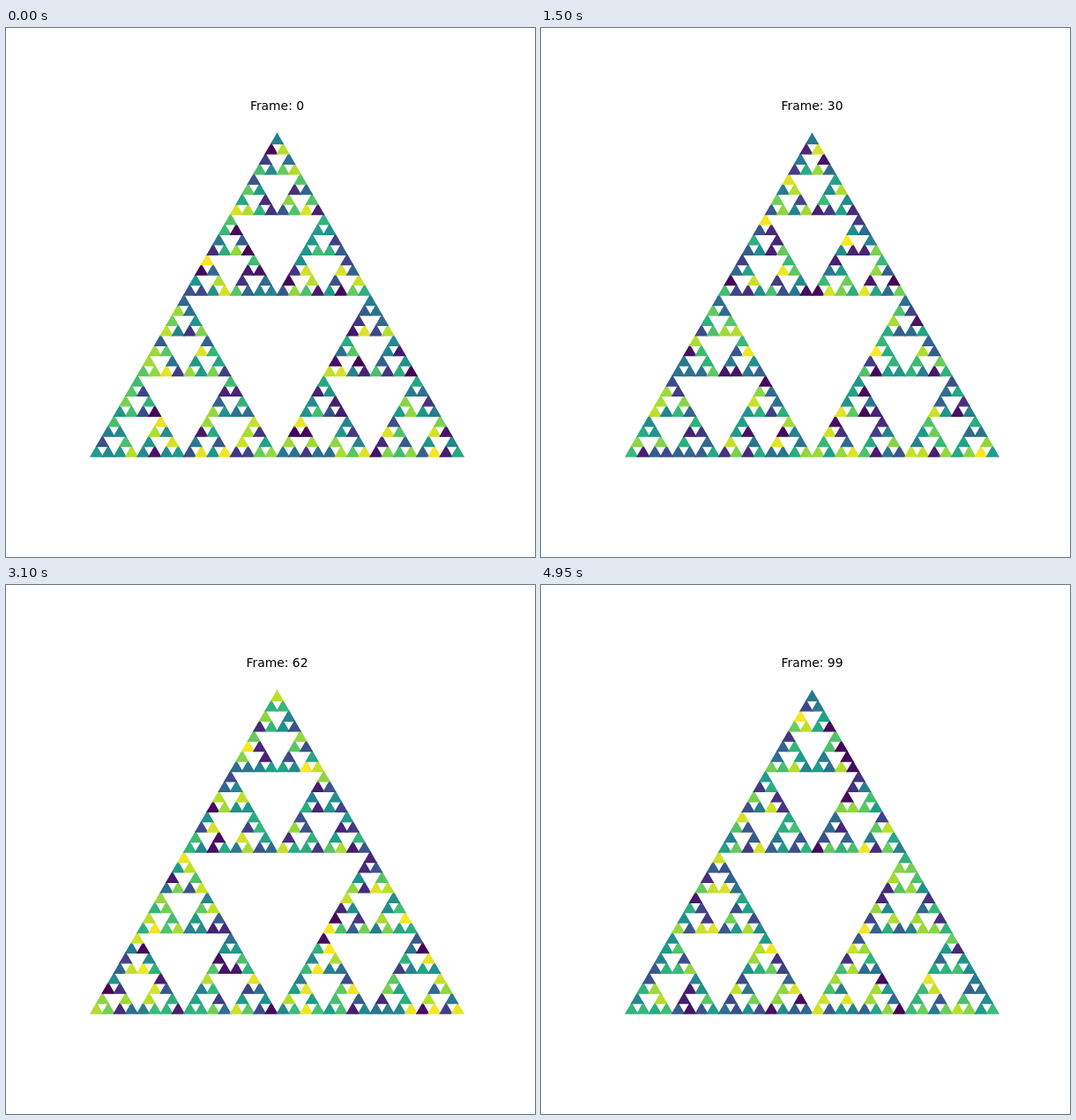
An HTML page with a canvas that plays this animation: 600 by 600 pixels, repeating every 5000 ms.

```html
<!DOCTYPE html>
<html lang="en">
<head>
<meta charset="utf-8">
<title>Sierpinski triangle</title>
<style>
  html, body { margin: 0; width: 100%; height: 100%; overflow: hidden; background: #fff; }
  canvas { display: block; }
</style>
</head>
<body>
<canvas id="stage" width="600" height="600"></canvas>
<script>
const ctx = document.getElementById('stage').getContext('2d');
const FRAME_MS = 50, FRAMES = 100, DEPTH = 5;
const SIDE = 465 / 1.1, RATIO = Math.sqrt(3) / 2;
const CENTER_X = 307.5, CENTER_Y = 303;

const VIRIDIS = [
  [68, 1, 84], [72, 40, 120], [62, 73, 137], [49, 104, 142], [38, 130, 142],
  [31, 158, 137], [53, 183, 121], [110, 206, 88], [181, 222, 43], [253, 231, 37]
];

function viridis(v) {
  const p = v * (VIRIDIS.length - 1), i = Math.floor(p);
  const mix = VIRIDIS[i].map((c, k) => Math.round(c + (VIRIDIS[i + 1][k] - c) * (p - i)));
  return `rgb(${mix})`;
}

// Seeded generator: each step of the loop always gets the same colours
function randomFrom(seed) {
  let a = Math.imul(seed + 1, 0x9e3779b1);
  return () => {
    a = (a + 0x6d2b79f5) | 0;
    let t = Math.imul(a ^ (a >>> 15), 1 | a);
    t = (t + Math.imul(t ^ (t >>> 7), 61 | t)) ^ t;
    return ((t ^ (t >>> 14)) >>> 0) / 4294967296;
  };
}

// (x, y) is the lower left corner
function sierpinski(x, y, side, depth, random) {
  const half = side / 2;
  if (depth) {
    sierpinski(x, y, half, depth - 1, random);
    sierpinski(x + half, y, half, depth - 1, random);
    sierpinski(x + half / 2, y - half * RATIO, half, depth - 1, random);
    return;
  }
  ctx.fillStyle = ctx.strokeStyle = viridis(random());
  ctx.beginPath();
  ctx.moveTo(x, y);
  ctx.lineTo(x + side, y);
  ctx.lineTo(x + half, y - side * RATIO);
  ctx.closePath();
  ctx.fill();
  ctx.stroke();
}

function draw(frame) {
  ctx.fillStyle = '#fff';
  ctx.fillRect(0, 0, 600, 600);
  ctx.lineWidth = 100 / 72;
  sierpinski(CENTER_X - SIDE / 2, CENTER_Y + SIDE * RATIO / 2, SIDE, DEPTH, randomFrom(frame));
  ctx.fillStyle = '#000';
  ctx.font = '13.89px "DejaVu Sans", sans-serif';
  ctx.textAlign = 'center';
  ctx.fillText('Frame: ' + frame, CENTER_X, 93);
}

const start = performance.now();
let shown = -1;

function tick() {
  const frame = Math.floor((performance.now() - start) / FRAME_MS) % FRAMES;
  if (frame !== shown) draw(shown = frame);
  requestAnimationFrame(tick);
}
tick();
</script>
</body>
</html>
```
